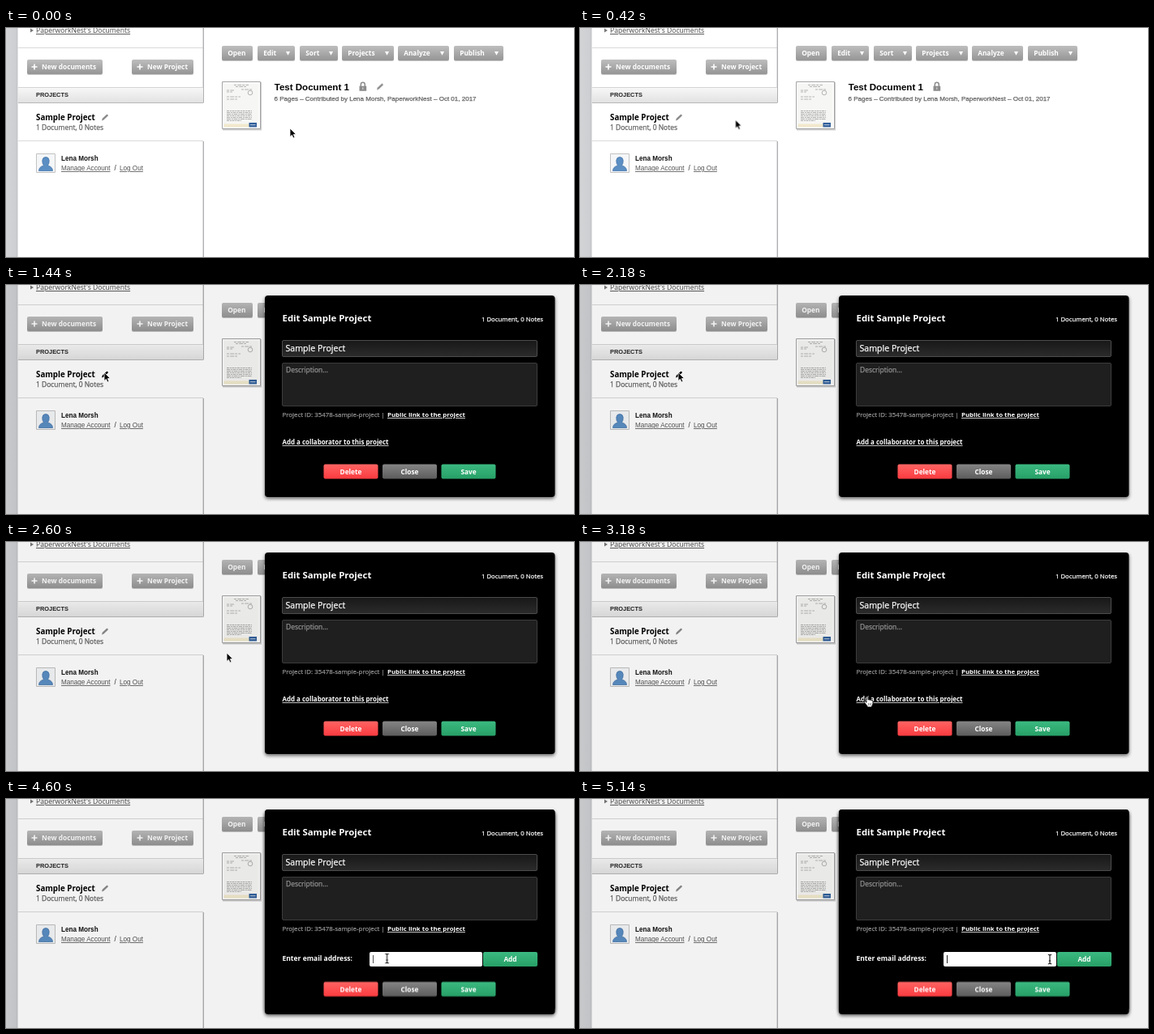
An HTML page for the animation above (5.16 s loop, 700 by 283 pixels).

```html
<!DOCTYPE html>
<html lang="en">
<head>
<meta charset="utf-8">
<title>Edit project dialog</title>
<style>
html, body { margin: 0; width: 100%; height: 100%; overflow: hidden; background: #fff; }
svg { display: block; width: 100vw; height: 100vh; }
text { font-family: "Open Sans", "Noto Sans", sans-serif; white-space: pre; }
.b { font-weight: 700; }
.arial { font-family: "Liberation Sans", Arial, sans-serif; }
.link { text-decoration: underline; }
.btn { font-weight: 700; font-size: 8.3px; fill: #fff; }
.firm { stroke-width: .25; }
.firm.pale { fill: #fff; stroke: #fff; }
.firm.mid { fill: #626262; stroke: #626262; }
.firm.dim { fill: #929292; stroke: #929292; }

.cut { animation: 5160ms step-end infinite; }
#veil, #dialog { animation-name: opened; }
#form { animation-name: asked; }
#invite { animation-name: invited; }
#actions { animation-name: pushed; }
#projectPencil { animation-name: hovered; }
#docPencil { animation-name: left; }
#arrow { animation-name: arrow; }
#hand { animation-name: hand; }
#beam { animation-name: beam; }
#caret { animation: caret 5160ms linear infinite; }
#pointer { animation: travel 5160ms ease-in-out infinite; }

@keyframes opened { 0% { opacity: 0 } 27.51%, 100% { opacity: 1 } }
@keyframes asked { 0% { opacity: 0 } 69.37%, 100% { opacity: 1 } }
@keyframes invited { 0% { opacity: 1 } 69.37%, 100% { opacity: 0 } }
@keyframes pushed { 0% { transform: none } 69.37%, 100% { transform: translateY(4.5px) } }
@keyframes hovered { 0% { fill: #8a8a8a } 11.6% { fill: #000 } 45%, 100% { fill: #8a8a8a } }
@keyframes left { 0% { opacity: 1 } 5.9%, 100% { opacity: 0 } }
@keyframes arrow { 0% { opacity: 1 } 11.6% { opacity: 0 } 27.51% { opacity: 1 } 60.5% { opacity: 0 } 84.5% { opacity: 1 } 88.6%, 100% { opacity: 0 } }
@keyframes hand { 0% { opacity: 0 } 11.6% { opacity: 1 } 27.51% { opacity: 0 } 60.5% { opacity: 1 } 84.5%, 100% { opacity: 0 } }
@keyframes beam { 0% { opacity: 0 } 88.6%, 100% { opacity: 1 } }
@keyframes caret { 0%, 77% { opacity: 1 } 78.3% { opacity: .6 } 79.5%, 88% { opacity: 0 } 89.5%, 100% { opacity: 1 } }
@keyframes travel {
  0% { transform: translate(350px, 124px) }
  13.2%, 24% { transform: translate(122.5px, 109px) }
  27.1% { transform: translate(121px, 108px) }
  44.6% { transform: translate(121px, 108px); animation-timing-function: linear }
  50.4% { transform: translate(272px, 137px); animation-timing-function: linear }
  58.1% { transform: translate(340px, 176px); animation-timing-function: ease-out }
  61.2%, 69% { transform: translate(354px, 190px) }
  71.7%, 83.3% { transform: translate(359px, 196px) }
  95%, 100% { transform: translate(579px, 198px) }
}
</style>
</head>
<body>
<svg viewBox="0 0 700 283" preserveAspectRatio="none">
  <defs>
    <linearGradient id="gray" x2="0" y2="1"><stop stop-color="#bebebe"/><stop offset="1" stop-color="#959595"/></linearGradient>
    <linearGradient id="dark" x2="0" y2="1"><stop stop-color="#858585"/><stop offset="1" stop-color="#5c5c5c"/></linearGradient>
    <linearGradient id="red" x2="0" y2="1"><stop stop-color="#ff6463"/><stop offset="1" stop-color="#fb3b40"/></linearGradient>
    <linearGradient id="green" x2="0" y2="1"><stop stop-color="#3bb980"/><stop offset="1" stop-color="#27a067"/></linearGradient>
    <linearGradient id="bar" x2="0" y2="1"><stop stop-color="#f8f8f8"/><stop offset="1" stop-color="#e2e2e3"/></linearGradient>
    <linearGradient id="field" x2="0" y2="1"><stop stop-color="#181818"/><stop offset="1" stop-color="#2b2b2b"/></linearGradient>
    <linearGradient id="strip"><stop stop-color="#d3d4d6"/><stop offset=".8" stop-color="#cecfd2"/><stop offset="1" stop-color="#c2c3c6"/></linearGradient>
    <filter id="soft" x="-10%" y="-10%" width="120%" height="120%"><feGaussianBlur stdDeviation="2"/></filter>
    <path id="pencil" d="M-4 4 -3.2 1.3 1.9-3.5Q2.7-4.1 3.5-3.3 4.2-2.5 3.5-1.8L-1.5 3.1Z"/>
  </defs>

  <g id="page">
    <path fill="#fff" d="M0 0H700V283H0Z"/>
    <path fill="url(#strip)" d="M0 0H14.5V283H0Z"/>
    <g fill="none" stroke="#dadada">
      <path d="M15 24.5H243M15 139.5H243"/>
      <path stroke="#b0b0b3" stroke-width="1.4" d="M243.3 0V92M243.3 140V283"/>
    </g>
    <path fill="url(#bar)" d="M15 73H243V92H15Z"/>
    <path stroke="#d4d4d4" d="M15 73.5H243"/>
    <path stroke="#b8b8b8" d="M15 92.5H243.5"/>

    <path fill="#777" d="M30 .5 34 3 30 5.5Z"/>
    <text class="link" x="37" y="6" font-size="8.6" fill="#444">PaperworkNest's Documents</text>
    <text class="b arial" x="37" y="85.3" font-size="7.4" fill="#222">PROJECTS</text>
    <text class="b" x="37" y="114" font-size="9.77" fill="#000">Sample Project</text>
    <use href="#pencil" id="projectPencil" class="cut" x="122" y="110.5"/>
    <text class="firm mid" x="37" y="125.8" font-size="8.47">1 Document, 0 Notes</text>

    <path fill="#f4f6f8" stroke="#c2c2c2" d="M37.5 155.5H60.5V178.5H37.5Z"/>
    <path fill="#5b8fc4" stroke="#3d6ea5" stroke-width=".7" d="M40.5 176.5Q40.5 171.5 46.5 170 44.5 167.5 44.8 163.5 45.2 159.5 49 159.5 52.8 159.5 53.2 163.5 53.5 167.5 51.5 170 57.5 171.5 57.5 176.5Z"/>
    <g font-size="8.15" fill="#555">
      <text class="b arial" x="68" y="164.2" fill="#111">Lena Morsh</text>
      <text class="link arial" x="68" y="176.2">Manage Account</text>
      <text class="arial" x="133.5" y="176.2" fill="#222">/</text>
      <text class="link arial" x="140" y="176.2">Log Out</text>
    </g>

    <g id="thumb">
      <path fill="#ccc" d="M267 67H315V126.5H267Z"/>
      <path fill="#fff" stroke="#a4a4a4" d="M266.5 66.5H313.5V124.5H266.5Z"/>
      <path fill="#f6f6f4" d="M268.5 68.5H311.5V122.5H268.5Z"/>
      <path fill="#f1e9cd" d="M268.5 118.5H300V122.5H268.5Z"/>
      <path fill="none" stroke="#888" stroke-width=".6" stroke-dasharray="3 1.2 5 1" d="M281 70.5H299M283 72.5H296M272 77H281M272 79H279M290 76H303M272 85H289M272 88H285"/>
      <circle cx="301" cy="80" r="2.8" fill="none" stroke="#999" stroke-width=".7"/>
      <path fill="#315f9b" d="M299.5 117H309V122.5H299.5Z"/>
      <path stroke="#b9c9dc" d="M301 119.7H307.5"/>
    </g>
    <text class="b arial" x="330.7" y="77" font-size="11.55" fill="#000">Test Document 1</text>
    <path fill="none" stroke="#8c8c8c" stroke-width="1.5" d="M437.3 72.5V70Q437.3 67.3 439.8 67.3T442.3 70V72.5"/>
    <path fill="#8c8c8c" d="M435.5 71.7H444.2V77.8H435.5Z"/>
    <path stroke="#ddd" d="M439.8 73.3V76"/>
    <use href="#pencil" id="docPencil" class="cut" x="461" y="72.5" fill="#8a8a8a"/>
    <text class="arial firm mid" x="330.5" y="90" font-size="8.03">6 Pages – Contributed by Lena Morsh, PaperworkNest – Oct 01, 2017</text>
  </g>

  <path id="veil" class="cut" fill="#000" fill-opacity=".05" d="M0 0H700V283H0Z"/>

  <g id="dialog" class="cut">
    <rect x="319" y="15" width="357.5" height="249" rx="4" fill="#000" opacity=".6" filter="url(#soft)"/>
    <rect x="319" y="13" width="357.5" height="249" rx="4"/>
    <g id="form" class="cut">
      <rect x="319" y="17" width="357.5" height="251" rx="4" fill="#000" opacity=".6" filter="url(#soft)"/>
      <rect x="319" y="13" width="357.5" height="253" rx="4"/>
      <text class="b" x="340.5" y="200.3" font-size="8.5" fill="#fff">Enter email address:</text>
      <rect x="448" y="189" width="139" height="18" rx="2" fill="#fff"/>
      <path id="caret" stroke="#222" d="M452.5 193V203"/>
    </g>
    <text class="b" x="340.5" y="45.3" font-size="11.4" fill="#fff">Edit Sample Project</text>
    <text class="firm pale" x="586" y="44.8" font-size="7.75">1 Document, 0 Notes</text>
    <rect x="340.5" y="68.5" width="314" height="20" rx="1.5" fill="url(#field)" stroke="#4c4c4c"/>
    <rect x="340.5" y="96.5" width="314" height="53" rx="1.5" fill="#1f1f1f" stroke="#3c3c3c"/>
    <text class="firm pale" x="344.5" y="82" font-size="10.6">Sample Project</text>
    <text class="firm dim" x="345" y="108" font-size="8.47">Description...</text>
    <text class="firm dim" x="340.5" y="163.2" font-size="7.9">Project ID: 35478-sample-project |</text>
    <text class="b link" x="470" y="163.2" font-size="7.85" fill="#fff">Public link to the project</text>
    <text id="invite" class="cut b link" x="340.5" y="197.3" font-size="7.96" fill="#fff">Add a collaborator to this project</text>
    <g id="actions" class="cut"></g>
  </g>

  <g id="pointer">
    <path id="arrow" class="cut" fill="#000" stroke="#fff" stroke-width=".8" d="M0 0V10.5L2.4 8.3 4 12 5.9 11.2 4.3 7.6H7.6Z"/>
    <g id="hand" class="cut" stroke="#000" stroke-width=".9" stroke-linejoin="round">
      <path fill="#fff" d="M-1 1Q0-.6 1 1V5Q2 4 3 5.2 4.2 4.4 5 5.7 6.6 5.2 7 6.8V9.5Q6.8 11.5 5.7 12.6V14H0V12.8L-3.7 8.2Q-4-.2 -2.7 6.7L-1 8.3Z"/>
      <path fill="none" d="M1.4 9V12M3 9V12M4.6 9V12" stroke-width=".4"/>
    </g>
    <path id="beam" class="cut" fill="none" stroke="#111" stroke-width="1.1" d="M-2.2-5.8Q0-5.8 0-4.3 0-5.8 2.2-5.8M0-4.5V4.5M-2.2 5.8Q0 5.8 0 4.3 0 5.8 2.2 5.8M-1.2 2H1.2"/>
  </g>
</svg>

<script>
const $ = id => document.getElementById(id);

function add(parent, tag, attrs, label = "") {
  const node = document.createElementNS("http://www.w3.org/2000/svg", tag);
  for (const key in attrs) node.setAttribute(key, attrs[key]);
  node.textContent = label;
  parent.append(node);
}

function button(parent, x, y, width, label, fill, textX) {
  const height = 18;
  if (fill === "gray") add(parent, "rect", { x, y: y + 1, width, height, rx: 2, fill: "#c4c4c4" });
  add(parent, "rect", { x, y, width, height, rx: 2, fill: `url(#${fill})` });
  const place = textX ? { x: textX } : { x: x + width / 2, "text-anchor": "middle" };
  add(parent, "text", { class: "btn", y: y + 12, ...place }, label);
}

const page = $("page");
for (const [x, width, label] of [[26, 93, "New documents"], [155, 76, "New Project"]]) {
  const textX = x + (x < 100 ? 18 : 19);
  button(page, x, 39, width, label, "gray", textX);
  add(page, "path", { d: `M${textX - 12.5} 48h7m-3.5-3.5v7`, stroke: "#fff", "stroke-width": 1.6 });
}

const menus = [[266, 38, "Open"], [310, 46, "Edit"], [362, 47, "Sort"], [414, 64, "Projects"], [483, 63, "Analyze"], [552, 61, "Publish"]];
for (const [x, width, label] of menus) {
  button(page, x, 22, width, label, "gray", x + 7.2);
  if (label !== "Open") add(page, "path", { d: `M${x + width - 11} 29h5l-2.5 4.8z`, fill: "#fff" });
}

for (let row = 0; row < 7; row++) {
  add($("thumb"), "path", {
    d: `M272 ${102.5 + row * 2}h${row === 6 ? 18 : 31}`,
    stroke: "#999", "stroke-width": 0.8, "stroke-dasharray": `${3 + row % 3} .8 2 .7`
  });
}

button($("actions"), 391.5, 221.5, 67, "Delete", "red");
button($("actions"), 464, 221.5, 67, "Close", "dark");
button($("actions"), 536.5, 221.5, 67, "Save", "green");
button($("form"), 588, 189, 67, "Add", "green");
</script>
</body>
</html>
```
